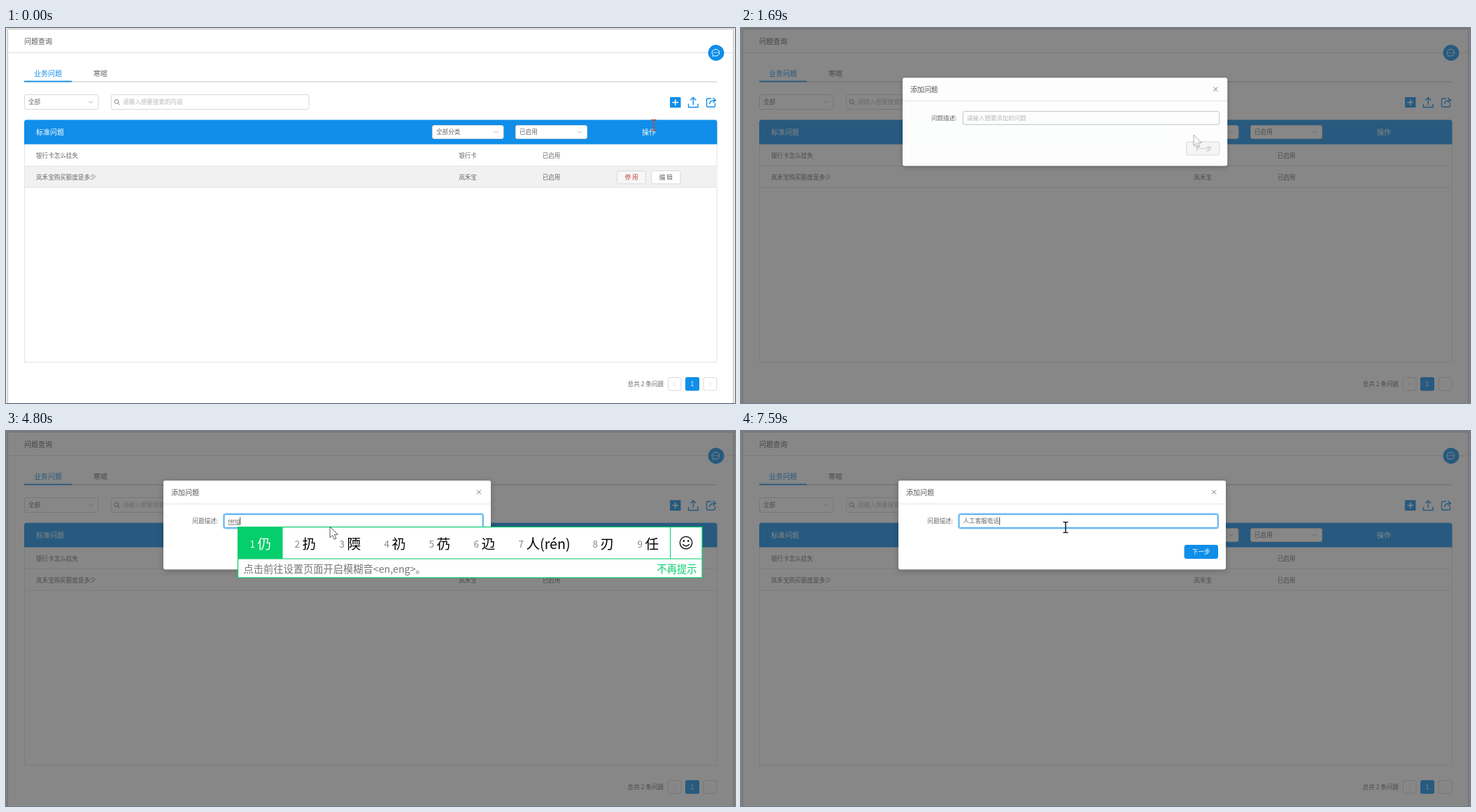
An HTML page for the animation above (8000 ms loop, 1042 by 537 pixels).

```html
<!DOCTYPE html>
<html lang="zh-CN">
<head>
<meta charset="utf-8">
<title>问题查询</title>
<style>
html, body { margin: 0; width: 100%; height: 100%; overflow: hidden; background: #fff; }
svg { display: block; width: 1042px; height: 537px; }
text { font-family: "Noto Sans CJK SC", "Noto Sans CJK", "Noto Sans", sans-serif; white-space: pre; }
.pinyin { font-family: Roboto, Arial, sans-serif; }
.modal { filter: drop-shadow(0 2px 4px rgba(0,0,0,.22)); }
</style>
</head>
<body>
<svg id="stage" viewBox="0 0 1042 537" xmlns="http://www.w3.org/2000/svg"></svg>
<script>
const LOOP = 8000;
const BLUE = '#108ee9', GREEN = '#05ce6c', LINE = '#d9d9d9', INK = '#666', HINT = '#b8b8b8';
const SMALL = 8.57;

// --- drawing helpers ---
const text = (x, cy, s, size = SMALL, fill = INK, more = '') =>
  `<text x="${x}" y="${cy + size * 0.37}" font-size="${size}" fill="${fill}" ${more}>${s}</text>`;
const mid = 'text-anchor="middle"', end = 'text-anchor="end"';
const rect = (x, y, w, h, fill, stroke = 'none', r = 0, more = '') =>
  `<rect x="${x}" y="${y}" width="${w}" height="${h}" rx="${r}" fill="${fill}" stroke="${stroke}" ${more}/>`;
const path = (d, stroke, w = 1, fill = 'none') =>
  `<path d="${d}" fill="${fill}" stroke="${stroke}" stroke-width="${w}"/>`;
const chevron = (x, y) => path(`M${x - 2.8} ${y - 1.4}l2.8 2.8l2.8 -2.8`, '#aaa', 0.9);
const select = (x, y, w, h, s) =>
  rect(x, y, w, h, '#fff', LINE, 2.5) + text(x + 5.5, y + h / 2, s) + chevron(x + w - 10.5, y + h / 2);
const row = (y, name, kind) =>
  text(43, y, name) + text(660, y, kind, SMALL, INK, mid) + text(779.5, y, '已启用', SMALL, INK, mid);

function page() {
  return rect(0, 0, 1042, 537, '#ececec') + rect(2.5, 1.5, 1037, 560, '#fff', '#c4c4c4')
    + text(26, 19.5, '问题查询', 10, '#555')
    + path('M3 35.5H1039', '#dedede')
    + text(40, 65.5, '业务问题', 10, BLUE) + text(125, 65.5, '寒暄', 10)
    + path('M26 77H1016', '#d6d6d6', 1.3) + rect(26, 75.6, 68, 1.8, BLUE)
    + select(26.5, 95.5, 105.5, 21, '全部')
    + rect(150.5, 95.5, 282.5, 21, '#fff', LINE, 2.5)
    + `<circle cx="158" cy="105.4" r="2.9" fill="none" stroke="#777" stroke-width=".9"/>`
    + path('M160.2 107.6l2.3 2.4', '#777')
    + text(167, 106, '请输入想要搜索的内容', SMALL, HINT)
    + rect(949, 99, 15.5, 15, BLUE, 'none', 1) + path('M952.5 106.5h8.4M956.7 102.3v8.4', '#fff', 1.4)
    + path('M975.5 108.5v5h13.6v-5M982.3 110V100M978.3 103.6l4 -4l4 4', BLUE, 1.4)
    + path('M1008 101h-5q-1.5 0 -1.5 1.5v9q0 1.5 1.5 1.5h9q1.5 0 1.5 -1.5v-4M1005.5 109q.5 -5.500 8 -5.500M1010.500 100l4 3.500l-4 3.500', BLUE, 1.4)
    + rect(26.5, 140, 989.5, 338.5, '#fff', '#e4e4e4')
    + '<g id="hover">' + rect(27, 197, 988.5, 32, '#f1f1f1') + '</g>'
    + path('M27 197.5H1016M27 228.500H1016', '#e6e6e6')
    + path('M26 166.500V135q0 -3.500 3.500 -3.500H1013q3.500 0 3.500 3.500V166.500z', 'none', 0, BLUE)
    + text(43, 149.5, '标准问题', 10, '#fff')
    + select(609.5, 139.5, 101.5, 19, '全部分类') + select(728.5, 139.5, 102, 19, '已启用')
    + text(919, 149.5, '操作', 10, '#fff', mid)
    + row(182.5, '银行卡怎么挂失', '银行卡') + row(213.5, '岚禾宝购买额度是多少', '岚禾宝')
    + '<g id="tools">' + rect(873.5, 204.5, 41, 18.5, '#f7f7f7', LINE, 2.5)
    + text(894, 214, '停 用', SMALL, '#c0402f', mid)
    + rect(922.5, 204.5, 41.5, 18.5, '#fff', LINE, 2.5) + text(943.3, 214, '编 辑', SMALL, INK, mid) + '</g>'
    + text(940, 510, '总共 2 条问题', SMALL, INK, end)
    + rect(946.5, 500.5, 18.5, 18.5, '#fff', LINE, 2.5) + path('M956.7 507.6l-2.300 2.200l2.300 2.200', '#ccc', 0.8)
    + rect(971, 500, 20, 19.5, BLUE, 'none', 2.5) + text(981, 510, '1', SMALL, '#fff', mid)
    + rect(997, 500.5, 19, 18.5, '#fff', LINE, 2.5) + path('M1005.300 507.6l2.300 2.200l-2.300 2.200', '#ccc', 0.8)
    + `<circle cx="1015" cy="35.5" r="11.4" fill="${BLUE}"/>`
    + path('M1010.300 40.500v-2.200a5.300 4.800 0 1 1 2.300 1.500z', '#fff', 1)
    + [1012.4, 1015, 1017.6].map(x => `<circle cx="${x}" cy="35.300" r=".8" fill="#fff"/>`).join('');
}

function modal() {
  return '<g id="modal" class="modal">' + rect(225, 71, 468, 127.3, '#fff', 'none', 2.8)
    + text(236, 88, '添加问题', 10, '#555')
    + path('M673 84.500l6 6M679 84.500l-6 6', '#777', 1)
    + path('M225 104.500H693', '#e4e4e4')
    + text(303, 129, '问题描述:', SMALL, INK, end)
    + '<g id="glow">' + rect(310.9, 118.4, 371.4, 21.2, 'none', '#8fcbf7', 3.2, 'stroke-width="1.8"') + '</g>'
    + rect(312, 119.5, 369.5, 19, '#fff', '#c4c4c4', 2.5, 'id="field"')
    + '<g id="holder">' + text(317.5, 129, '请输入想要添加的问题', SMALL, HINT) + '</g>'
    + text(317.5, 129, '', SMALL, INK, 'id="done"')
    + text(317.5, 128.6, '', 8.3, INK, 'id="comp" class="pinyin"')
    + rect(0, 133.600, 0, 0.8, '#555', 'none', 0, 'id="under"')
    + rect(318, 123.5, 0.9, 11, '#333', 'none', 0, 'id="caret"')
    + rect(634, 163.5, 47.5, 19, '#f7f7f7', LINE, 2.5, 'id="next"')
    + text(657.7, 173.2, '下一步', SMALL, HINT, mid + ' id="nextText"') + '</g>';
}

function cursors() {
  const beam = 'M-3.500 -7.500h2.500q1 0 1 1v13q0 1 -1 1h-2.500M3.500 -7.500h-2.500q-1 0 -1 1M3.500 7.500h-2.500q-1 0 -1 -1';
  const hand = 'M-1.600 1.500q0 -1.500 1.500 -1.500t1.500 1.500v6l6.500 1.500q2.500 .6 2.500 2.500v4q0 1.500 -1 3l-.5 1.500h-8l-5.500 -7.500q-1 -1.600 .3 -2.200q1 -.4 2.700 1.500z';
  return '<g id="beam">' + path(beam, '#222', 1.6) + '</g>'
    + '<g id="arrow">' + path('M0 0V15.600L3.600 12.300L6.200 18L8.900 16.800L6.300 11.300H11.300Z', '#444', 0.9, '#fff') + '</g>'
    + '<g id="hand">' + path(hand, '#333', 0.9, '#fff') + '</g>';
}

const stage = document.getElementById('stage');
stage.innerHTML = page() + rect(0, 0, 1042, 537, '#373737', 'none', 0, 'id="mask"')
  + modal() + '<g id="ime"></g>' + cursors();
const el = {};
stage.querySelectorAll('[id]').forEach(n => el[n.id] = n);
const show = (n, on) => n.setAttribute('visibility', on ? 'visible' : 'hidden');
const set = (n, o) => { for (const k in o) n.setAttribute(k, o[k]); };

// --- timelines: [time, value...] ---
const typed = [
  [0, '', ''], [4320, '', 'r'], [4460, '', 're'], [4530, '', 'ren'], [4730, '', 'reng'],
  [4930, '', 'rengo'], [5130, '', 'rengon'], [5200, '', 'rengong'], [5460, '人工', ''],
  [5860, '人工', 'k'], [6190, '人工', 'ke'], [6390, '人工', 'kef'], [6460, '人工', 'kefu'],
  [6720, '人工客服', ''], [6860, '人工客服', 'd'], [7000, '人工客服', 'di'], [7060, '人工客服', 'dia'],
  [7130, '人工客服', 'dian'], [7200, '人工客服', 'dianh'], [7330, '人工客服', 'dianhu'],
  [7390, '人工客服', 'dianhua'], [7590, '人工客服电话', '']
];
const lists = [
  [0, 0, ''],
  [4600, 331, '人 任 认 仁 忍 刃 仍 扔 韧', 1],
  [4800, 331, '仍 扔 陾 礽 芿 辸 人(rén) 刃 任', 1],
  [5200, 331, '人工 人公 人供 仍 扔 陾 礽 芿 辸', 1],
  [5460, 0, ''],
  [5930, 341, '看 可 开 靠 快 客 口'],
  [6190, 341, '可 课 客 科 克 刻 颗 棵 渴'],
  [6460, 341, '客服 克服 可 课 客 科 克 刻 颗'],
  [6720, 0, ''],
  [6930, 357, '的 大 都 到 点 等 地'],
  [7130, 357, '点 电 店 典 垫 殿 淀 碘'],
  [7390, 357, '电话 电化 点化 点画 电 点 店 垫'],
  [7590, 0, '']
];
const moves = [
  [70, 926, 139], [490, 943, 104], [740, 943, 104], [750, 967, 99], [940, 967, 99], [1020, 957, 106],
  [1340, 957, 106], [1550, 765, 132], [1690, 647, 153], [2040, 478, 135], [2320, 464, 134], [2460, 464, 134], [2600, 464, 138]
];
const at = (rows, t) => rows.filter(r => r[0] <= t).pop();

function pointer(t) {
  const i = moves.findIndex(m => m[0] > t);
  if (i < 0) return moves[moves.length - 1].slice(1);
  if (!i) return moves[0].slice(1);
  const a = moves[i - 1], b = moves[i], k = (t - a[0]) / (b[0] - a[0]);
  return [a[1] + (b[1] - a[1]) * k, a[2] + (b[2] - a[2]) * k];
}

// cubic-bezier(.08, .82, .17, 1)
function ease(x) {
  if (x <= 0) return 0;
  if (x >= 1) return 1;
  let lo = 0, hi = 1, u;
  for (let i = 0; i < 24; i++) {
    u = (lo + hi) / 2;
    const v = 1 - u;
    if (0.24 * u * v * v + 0.51 * u * u * v + u ** 3 < x) lo = u; else hi = u;
  }
  return 2.46 * u * (1 - u) ** 2 + 3 * u * u * (1 - u) + u ** 3;
}

let listed;
function drawList(entry) {
  if (entry === listed) return;
  listed = entry;
  const [, left, words, tip] = entry;
  if (!words) { el.ime.innerHTML = ''; return; }
  let x = left, cells = '';
  words.split(' ').forEach((w, i) => {
    const width = 44 + (w.includes('(') ? 62 : 20 * w.length);
    if (!i) cells += rect(x, 137, width + 0.5, 46, GREEN);
    cells += text(x + 17.5, 162.5, i + 1, 13.5, i ? '#888' : '#fff')
      + text(x + 28.5, 161.5, w, 19.6, i ? '#000' : '#fff');
    x += width;
  });
  const w = x + 46 - left, h = tip ? 73 : 46, cx = x + 23;
  let s = rect(left, 137, w, h, '#fff') + cells + path(`M${x}.5 137V183`, GREEN)
    + `<circle cx="${cx}" cy="160" r="8.700" fill="none" stroke="#111" stroke-width="1.400"/>`
    + `<circle cx="${cx - 3.2}" cy="157.500" r="1.300"/><circle cx="${cx + 3.2}" cy="157.500" r="1.300"/>`
    + path(`M${cx - 4.8} 162q4.800 5.500 9.600 0`, '#111', 1.3);
  if (tip) {
    s += path(`M${left} 183H${left + w}`, GREEN, 1.2)
      + text(left + 8.5, 197.5, '点击前往设置页面开启模糊音&lt;en,eng&gt;。', 14.25, '#777')
      + text(left + w - 7.5, 197.5, '不再提示', 14.25, GREEN, end);
  }
  el.ime.innerHTML = s + rect(left + 0.5, 137.5, w - 0.5, h - 0.5, 'none', GREEN, 0, 'stroke-width="1.200"');
}

function drawField(t) {
  const [, done, comp] = at(typed, t);
  const x0 = 317.5 + done.length * SMALL;
  el.done.textContent = done;
  el.comp.textContent = comp;
  const w = comp ? el.comp.getComputedTextLength() : 0;
  set(el.comp, { x: x0 });
  set(el.under, { x: x0, width: w });
  set(el.caret, { x: x0 + w + 0.3 });
  show(el.holder, !done && !comp);
  show(el.caret, (t >= 2460 && t < 2800) || (t >= 3260 && t < 3720) || t >= 4120);
  const ready = t >= 5460;
  set(el.next, { fill: ready ? BLUE : '#f7f7f7', stroke: ready ? BLUE : LINE });
  set(el.nextText, { fill: ready ? '#fff' : HINT });
  set(el.field, { stroke: t < 2110 ? '#c4c4c4' : '#35a0ee' });
  set(el.glow, { opacity: Math.max(0, Math.min(1, (t - 2180) / 280)) });
}

function drawCursor(t, q) {
  const [x, y] = pointer(q);
  const kind = t < 70 ? 'beam' : t < 750 ? 'arrow' : t < 1410 ? 'hand'
    : t < 2110 ? 'arrow' : t < 4600 ? 'beam' : t < 7590 ? 'arrow' : 'beam';
  for (const k of ['beam', 'arrow', 'hand']) show(el[k], k === kind);
  const off = kind === 'arrow' && t >= 4600 ? [-1, -1] : [0, 0];
  set(el[kind], { transform: `translate(${x + off[0]} ${y + off[1]})` });
  el.beam.firstChild.setAttribute('stroke', t < 70 ? '#b5543c' : '#222');
  set(el.arrow, { opacity: t >= 1690 && t < 1760 ? 0.45 : 1 });
}

function draw(t) {
  const shift = t >= 600 ? 10 : 0;
  const q = Math.floor((t - shift) / 70) * 70 + shift;
  show(el.tools, t < 210);
  set(el.hover, { opacity: Math.max(0, Math.min(1, 1 - (q - 140) / 280)) });

  set(el.mask, { opacity: 0.6 * Math.max(0, Math.min(1, (q - 1377) / 293)) });
  const p = ease((q - 1377) / 440), s = 0.2 + 0.8 * p;
  show(el.modal, p > 0);
  set(el.modal, { opacity: p, transform: `translate(${960 * (1 - s)} ${106 * (1 - s)}) scale(${s})` });
  if (p > 0) drawField(t);
  else for (const k of ['holder', 'caret']) show(el[k], false);
  drawList(at(lists, t));
  drawCursor(t, q);
}

const start = performance.now();
function tick(now) {
  draw(Math.max(0, now - start) % LOOP);
  requestAnimationFrame(tick);
}
draw(0);
requestAnimationFrame(tick);
</script>
</body>
</html>
```
